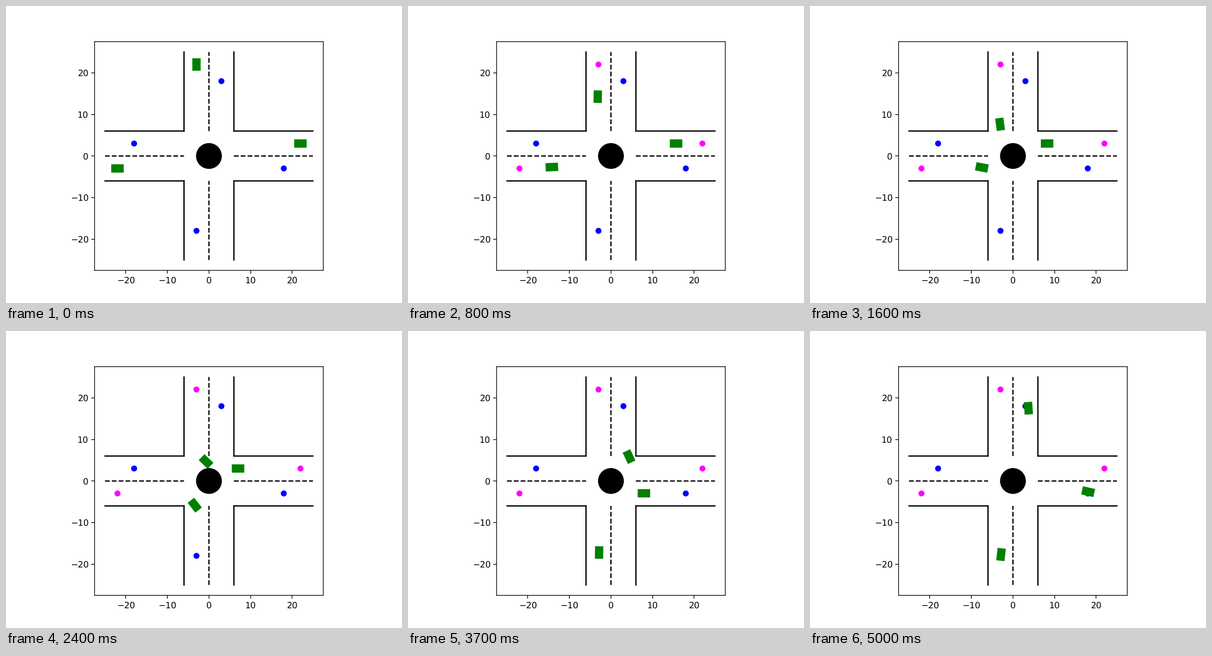
These frames come from a looping animation (864x648 px, 5100 ms). A matplotlib script:

```python
import math

import matplotlib.pyplot as plt
from matplotlib.animation import FuncAnimation
from matplotlib.patches import Circle, Rectangle

FRAMES, INTERVAL = 51, 100
HALF, ROAD = 25, 6
LENGTH, WIDTH = 3, 2
CREEP = 0.05  # near standstill, still defines a heading

# Key poses: frame, x, y, heading in degrees, speed in units per frame
EASTBOUND = [
    (0, -22, -3, 0, 0.8),
    (16, -7.47, -2.75, -11, 0.55),
    (24, -3.42, -5.82, -52, 0.75),
    (32, -2.98, -13.45, -85, 1),
    (39, -2.87, -17.68, -96.5, CREEP),
]
SOUTHBOUND = [
    (0, -3, 22, -90, 0.73),
    (16, -3.1, 7.63, -82, 0.46),
    (24, -0.7, 4.69, -44, 0.8),
    (32, 4.4, -1.33, -59, 0.9),
    (42, 12.45, -2.62, 1, 0.86),
    (50, 18.09, -2.57, -12.5, CREEP),
]
WESTBOUND = [
    (0, 22, 3, 180, 0.4),
    (16, 8.21, 3, 180, 0.68),
    (21, 7, 3, 180, CREEP),
    (32, 7, 3, 180, CREEP),
    (36, 4.7, 5.2, 120, 0.75),
    (42, 3.5, 9.58, 92.5, 0.85),
    (50, 3.72, 17.5, 93.6, 0.9),
]


def hermite(p, q, m, n, s):
    """Value and slope of the cubic from p to q with end slopes m and n."""
    value = (p + (q - p) * s * s * (3 - 2 * s)
             + m * s * (1 - s) ** 2 - n * s * s * (1 - s))
    slope = (6 * (q - p) * s * (1 - s)
             + m * (1 - s) * (1 - 3 * s) + n * s * (3 * s - 2))
    return value, slope


def pose(keys, frame):
    """Position and heading of a car that follows smooth arcs between poses."""
    for start, end in zip(keys, keys[1:]):
        if start[0] <= frame < end[0] and start[1:3] != end[1:3]:
            break
    else:
        return max(k for k in keys if k[0] <= frame)[1:4]
    t0, x0, y0, a0, v0 = start
    t1, x1, y1, a1, v1 = end
    span = t1 - t0
    a0, a1 = math.radians(a0), math.radians(a1)
    s = (frame - t0) / span
    x, dx = hermite(x0, x1, span * v0 * math.cos(a0), span * v1 * math.cos(a1), s)
    y, dy = hermite(y0, y1, span * v0 * math.sin(a0), span * v1 * math.sin(a1), s)
    return x, y, math.degrees(math.atan2(dy, dx))


def draw_roads(ax):
    for a, b in ((-HALF, -ROAD), (ROAD, HALF)):
        for side in (-ROAD, ROAD):
            ax.plot([a, b], [side, side], "k")
            ax.plot([side, side], [a, b], "k")
        ax.plot([a, b], [0, 0], "--k")
        ax.plot([0, 0], [a, b], "--k")
    ax.add_patch(Circle((0, 0), 3, color="k"))


def draw_dots(ax, points, color):
    for point in points:
        ax.add_patch(Circle(point, 0.72, facecolor=color, linewidth=0, zorder=3))


plt.rcParams.update({"path.snap": False, "text.hinting": "none"})
fig, ax = plt.subplots(figsize=(6.4, 4.8), dpi=135)
ax.set_aspect("equal")
ax.set(xlim=(-27.5, 27.5), ylim=(-27.5, 27.5),
       xticks=range(-20, 21, 10), yticks=range(-20, 21, 10))
draw_roads(ax)

routes = (EASTBOUND, SOUTHBOUND, WESTBOUND)
draw_dots(ax, [route[0][1:3] for route in routes], "magenta")
draw_dots(ax, [(-18, 3), (3, 18), (18, -3), (-3, -18)], "blue")
cars = [ax.add_patch(Rectangle((0, 0), LENGTH, WIDTH, rotation_point="center",
                               facecolor="green", linewidth=0, zorder=5))
        for _ in routes]


def update(frame):
    for car, route in zip(cars, routes):
        x, y, heading = pose(route, frame)
        car.set_xy((x - LENGTH / 2, y - WIDTH / 2))
        car.set_angle(heading)
    return cars


anim = FuncAnimation(fig, update, frames=FRAMES, interval=INTERVAL,
                     init_func=lambda: update(0), repeat=True, repeat_delay=0)
plt.show()
```
